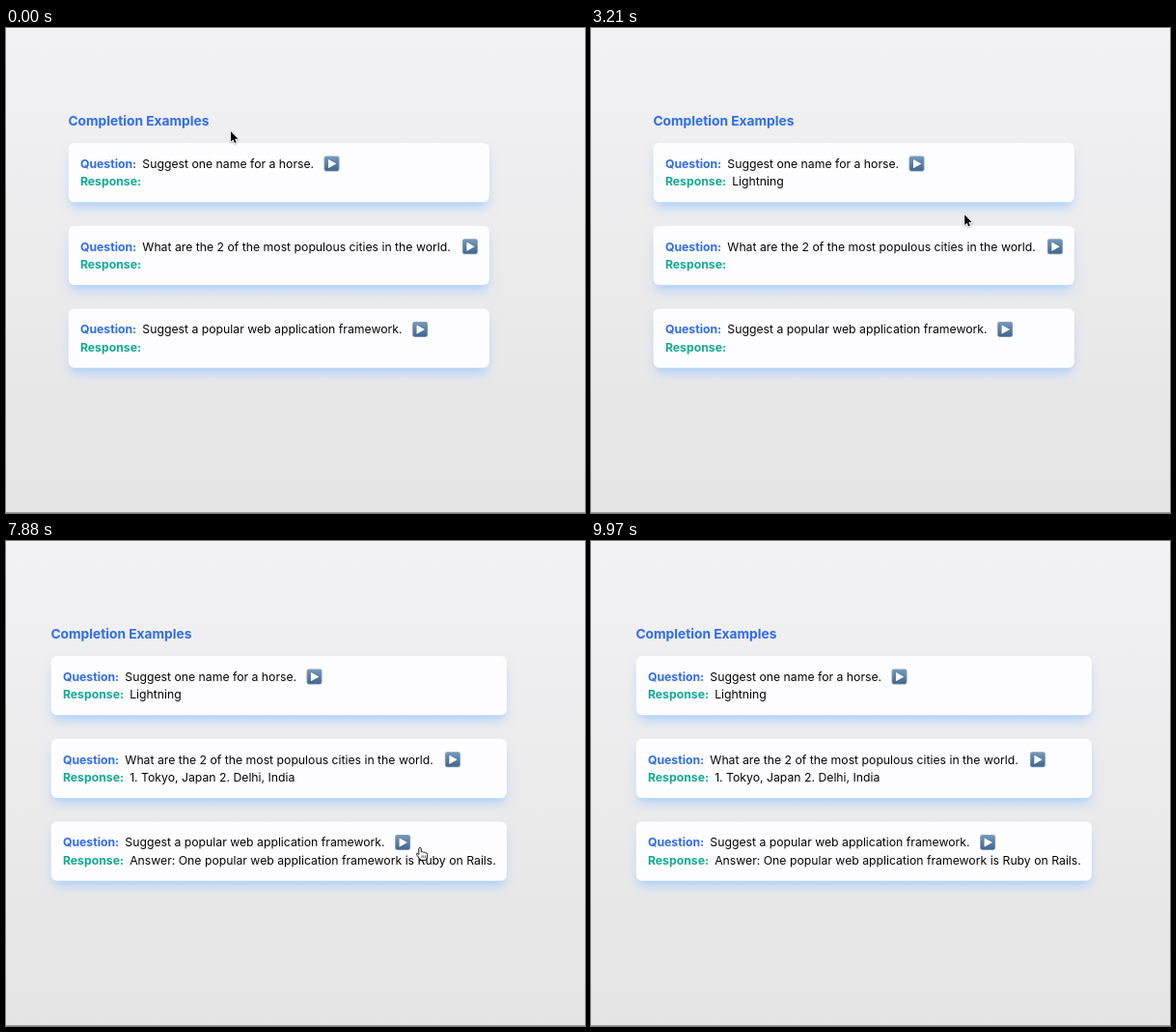
An HTML page with a canvas that plays this animation: 600x502 px, repeating every 10 s.

```html
<!DOCTYPE html>
<html lang="en">
<head>
<meta charset="utf-8">
<title>Completion Examples</title>
<style>
  html, body { margin: 0; width: 100%; height: 100%; overflow: hidden; background: #ebeaec; }
  canvas { display: block; width: 600px; height: 502px; }
</style>
</head>
<body>
<canvas id="stage"></canvas>
<script>
const W = 600, H = 502, LOOP = 10000;
const canvas = document.getElementById('stage');
const ctx = canvas.getContext('2d');
const dpr = window.devicePixelRatio || 1;
canvas.width = W * dpr;
canvas.height = H * dpr;

const SCALE = 0.765;            // CSS pixels of the page to stage pixels
const BLUE = '#2f6deb', TEAL = '#12a995';
const FAMILY = 'Inter, sans-serif';
const BODY = 16 * SCALE;
const PAD = 16 * SCALE;
const MARGIN = 8 * SCALE;
const LINE = 24 * SCALE;
const CARD_H = 80 * SCALE;
const CENTER = 282.8;
const EXPAND_AT = 7500;

const cards = [
  { y: 119, button: 272.8, start: 1200, end: 2500,
    question: 'Suggest one name for a horse.', answer: 'Lightning' },
  { y: 204.8, button: 416.2, start: 4150, end: 5250,
    question: 'What are the 2 of the most populous cities in the world.',
    answer: '1. Tokyo, Japan 2. Delhi, India' },
  { y: 290.5, button: 364.4, start: 6650, end: EXPAND_AT,
    question: 'Suggest a popular web application framework.',
    answer: 'Answer: One popular web application framework is Ruby on Rails.' },
];

// Each move is a quadratic curve: [start, end, from, control, to]
const moves = [
  [120, 1000, [233, 107], [285, 118], [333.5, 140]],
  [2842, 3692, [333.5, 140], [392, 222], [492, 226]],
  [3740, 3960, [492, 226], [486, 227], [480, 225]],
  [5500, 6220, [480, 225], [462, 280], [429, 317]],
  [8300, 8950, [429, 317], [470, 170], [560, -20]],
];

const smooth = u => u * u * (3 - 2 * u);
const leftEdge = t => CENTER - (t < EXPAND_AT ? 436.2 : 472.2) / 2;

function cursorAt(t) {
  let move = moves[0];
  for (const m of moves) if (t >= m[0]) move = m;
  const [start, end, from, control, to] = move;
  const s = smooth(Math.min(1, Math.max(0, (t - start) / (end - start))));
  return [0, 1].map(i =>
    (1 - s) ** 2 * from[i] + 2 * s * (1 - s) * control[i] + s * s * to[i]);
}

function roundRect(x, y, w, h, r) {
  ctx.beginPath();
  ctx.roundRect(x, y, w, h, r);
}

function text(str, x, y, color, size = BODY, weight = 400) {
  ctx.font = `${weight} ${size}px ${FAMILY}`;
  ctx.fillStyle = color;
  ctx.fillText(str, x, y);
  return x + ctx.measureText(str).width;
}

function background() {
  const g = ctx.createLinearGradient(0, 0, 0, H);
  g.addColorStop(0, '#f2f1f4');
  g.addColorStop(0.5, '#ebebec');
  g.addColorStop(1, '#e5e4e5');
  ctx.fillStyle = g;
  ctx.fillRect(0, 0, W, H);
  ctx.fillStyle = '#9b9b9c';
  ctx.fillRect(0, H - 1, W, 1);
}

function shadow(x, y, w, h, offset, blur, inset) {
  ctx.save();
  ctx.shadowColor = '#b0d1fa';
  ctx.shadowOffsetY = offset * SCALE * dpr;
  ctx.shadowBlur = blur * SCALE * dpr;
  ctx.fillStyle = '#fdfcfe';
  const d = inset * SCALE;
  roundRect(x + d, y + d, w - 2 * d, h - 2 * d, 5);
  ctx.fill();
  ctx.restore();
}

function playButton(cx, cy) {
  ctx.save();
  ctx.translate(cx, cy);
  roundRect(-8, -8, 16, 16, 2.4);
  ctx.fillStyle = '#8b9fb4';
  ctx.fill();
  const g = ctx.createLinearGradient(0, -7, 0, 7);
  g.addColorStop(0, '#7398bd');
  g.addColorStop(1, '#41678f');
  roundRect(-7.2, -7.2, 14.4, 14.4, 1.8);
  ctx.fillStyle = g;
  ctx.fill();
  ctx.beginPath();
  ctx.moveTo(-3.6, -4.7);
  ctx.lineTo(5, 0);
  ctx.lineTo(-3.6, 4.7);
  ctx.closePath();
  ctx.strokeStyle = '#3e6085';
  ctx.lineWidth = 0.8;
  ctx.stroke();
  ctx.fillStyle = '#fff';
  ctx.fill();
  ctx.restore();
}

function dotRing(count, radius, size, angle) {
  for (let i = 0; i < count; i++) {
    const a = angle + i * 2 * Math.PI / count;
    ctx.beginPath();
    ctx.arc(radius * Math.cos(a), radius * Math.sin(a), size, 0, 2 * Math.PI);
    ctx.fill();
  }
}

function spinner(cx, cy, age) {
  ctx.save();
  ctx.translate(cx, cy);
  ctx.scale(0.1133, 0.1133);
  ctx.fillStyle = TEAL;
  dotRing(4, 19.5, 10, -age / 2500 * 2 * Math.PI);
  dotRing(8, 55.5, 12, age / 8000 * 2 * Math.PI);
  ctx.restore();
}

function drawCard(card, left, t) {
  const { y } = card;
  const width = 2 * (CENTER - left);
  shadow(left, y, width, CARD_H, 10, 15, 3);
  shadow(left, y, width, CARD_H, 4, 6, 4);
  roundRect(left, y, width, CARD_H, 8 * SCALE);
  ctx.fillStyle = '#fdfcfe';
  ctx.fill();

  const x = left + PAD;
  const base = y + PAD + LINE / 2 + 4.4;
  let end = text('Question:', x, base, BLUE, BODY, 700);
  text(card.question, end + MARGIN, base, '#060606');
  playButton(left + card.button, y + 21.5);

  end = text('Response:', x, base + LINE, TEAL, BODY, 700);
  if (t >= card.end) text(card.answer, end + MARGIN, base + LINE, '#060606');
  else if (t >= card.start) spinner(end + MARGIN + 7.7, y + 41, t - card.start);
}

const arrow = new Path2D('M0 0V10.6L2.4 8.4L4 12L5.6 11.3L4.1 7.8H7.4Z');
const hand = new Path2D('M-1.2 1.2Q0 -.8 1.2 1.2L1.4 5Q2.6 4 3.6 5.3Q5 4.6 5.8 5.9' +
  'Q7.6 5.6 7.7 7.4L7.4 10L6.6 12V13.3H.4L.3 12.2Q-1.5 10.5 -2.6 8.7' +
  'Q-4 7 -3.4 6.4Q-2.6 5.7 -1.2 7.6Z');
const palm = new Path2D('M1.9 8.3V11M3.7 8.3V11M5.4 8.3V11');

function drawCursor(t) {
  const [x, y] = cursorAt(t);
  // The pointer style only updates when the mouse moves, so the first layout decides.
  const over = cards.some(c =>
    Math.abs(x - leftEdge(0) - c.button) < 8.5 && Math.abs(y - c.y - 21.5) < 8.5);
  ctx.save();
  ctx.translate(x, y);
  ctx.lineJoin = 'round';
  ctx.shadowColor = 'rgba(0,0,0,.3)';
  ctx.shadowBlur = 2 * dpr;
  ctx.shadowOffsetY = dpr;
  if (over) {
    ctx.fillStyle = '#fff';
    ctx.fill(hand);
    ctx.shadowColor = 'transparent';
    ctx.strokeStyle = '#111';
    ctx.lineWidth = 0.9;
    ctx.stroke(hand);
    ctx.lineWidth = 0.6;
    ctx.stroke(palm);
  } else {
    ctx.strokeStyle = '#fff';
    ctx.lineWidth = 1.6;
    ctx.stroke(arrow);
    ctx.shadowColor = 'transparent';
    ctx.fillStyle = '#000';
    ctx.fill(arrow);
  }
  ctx.restore();
}

function render(t) {
  ctx.setTransform(dpr, 0, 0, dpr, 0, 0);
  background();
  const left = leftEdge(t);
  text('Completion Examples', left - 0.3, 100.8, BLUE, 18 * SCALE, 700);
  for (const card of cards) drawCard(card, left, t);
  drawCursor(t);
}

const begin = performance.now();
function tick() {
  render((performance.now() - begin) % LOOP);
  requestAnimationFrame(tick);
}
tick();
</script>
</body>
</html>
```
